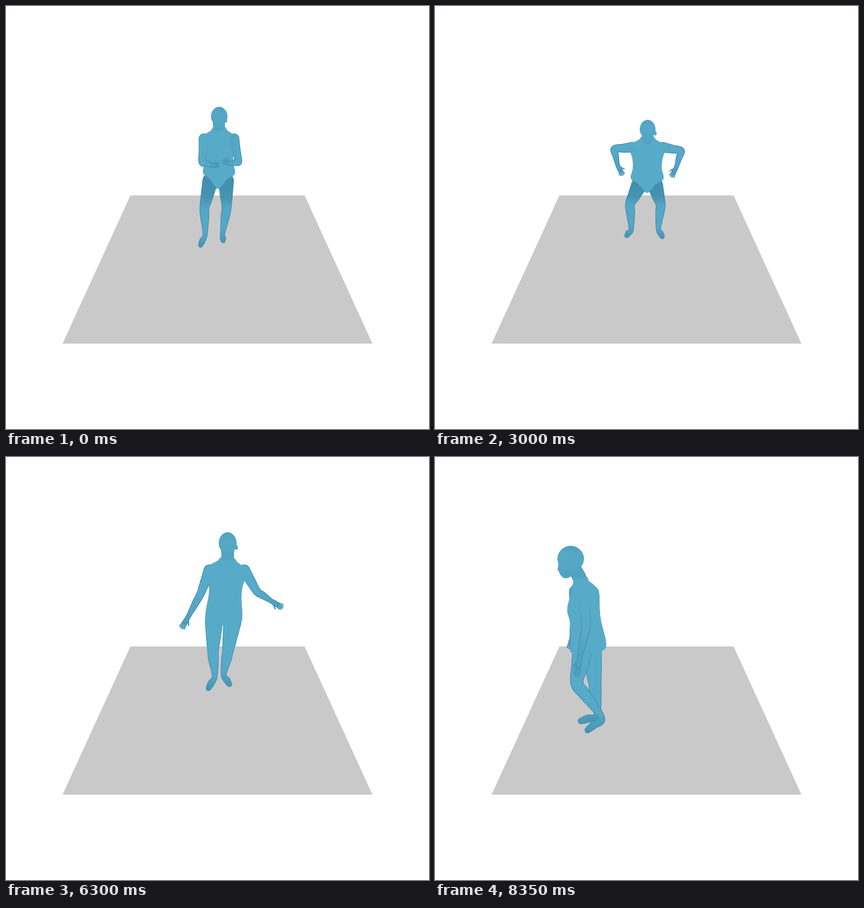
Write an HTML page with a canvas that moves like this. It is 748x748 px and loops after 8.4 s.

```html
<!DOCTYPE html>
<html lang="en">
<head>
<meta charset="utf-8">
<title>Figure on a floor</title>
<style>
html, body { margin: 0; width: 100%; height: 100%; overflow: hidden; background: #fff; }
canvas { display: block; }
</style>
</head>
<body>
<canvas id="stage" width="748" height="748"></canvas>
<script>
const ctx = document.getElementById('stage').getContext('2d');
const LOOP = 8400, STEP = 50, TURNED = 6900;
const BASE = [87, 171, 201], DARK = [66, 140, 171];
const tone = (k, alpha = 1) =>
  `rgba(${BASE.map((v, i) => Math.round(v + (DARK[i] - v) * k))},${alpha})`;
const EDGE = tone(.9);

// look: size, turn to the side, seated. spine: head, neck, crotch.
// Arms: elbow, wrist, fingertip. Legs: knee, ankle, toe.
const rest = {
  look: [.9, .15, 1], spine: [377,195, 377,214, 375,323],
  armL: [347,276, 365,282, 377,281], armR: [411,275, 396,279, 383,273],
  legL: [351,357, 352,404, 344,423], legR: [390,357, 383,403, 384,415]
};
const braced = {
  look: [.9, .05, 1], spine: [380,195, 379,215, 376,323],
  armL: [340,276, 354,288, 367,293], armR: [414,276, 400,288, 386,292],
  legL: [345,357, 344,405, 335,422], legR: [395,358, 385,405, 390,421]
};
const crouch = {
  look: [.9, 0, 1], spine: [376,218, 376,231, 375,330],
  armL: [317,253, 323,281, 332,300], armR: [435,256, 427,284, 418,303],
  legL: [345,350, 347,395, 339,406], legR: [399,351, 395,394, 402,408]
};
const stand = {
  look: [1, .1, 0], spine: [368,142, 369,167, 371,291],
  armL: [330,240, 323,274, 327,306], armR: [412,238, 420,274, 420,305],
  legL: [355,338, 356,383, 350,402], legR: [389,338, 390,381, 395,404]
};
const sway = {
  look: [1.02, 0, 0], spine: [392,152, 392,178, 384,297],
  armL: [344,242, 323,281, 310,304], armR: [444,238, 468,254, 490,267],
  legL: [366,345, 369,388, 358,409], legR: [392,345, 385,385, 395,402]
};
const stride = {
  look: [1.12, .6, 0], spine: [330,177, 345,206, 350,350],
  armL: [319,285, 308,318, 305,347], armR: [382,300, 375,348, 374,383],
  legL: [333,384, 370,402, 373,420], legR: [358,400, 361,458, 336,479]
};
const exit = {
  look: [1.18, 1, 0], spine: [240,180, 255,212, 262,352],
  armL: [248,290, 243,318, 239,340], armR: [267,299, 256,354, 250,388],
  legL: [283,403, 286,457, 258,467], legR: [251,400, 295,462, 270,483]
};

function blend(a, b, k, legs = k) {
  const out = {};
  for (const part in a) {
    const amount = part.startsWith('leg') ? legs : k;
    out[part] = a[part].map((v, i) => v + (b[part][i] - v) * amount);
  }
  return out;
}
const spread = {
  ...blend(stand, sway, .35),
  armL: [317,230, 288,253, 270,262], armR: [448,226, 486,240, 514,249]
};
const keys = [
  [0, rest], [1200, braced],
  [1700, blend(braced, crouch, .3, 0)], [2500, blend(braced, crouch, .78, .2)],
  [3000, crouch], [3400, blend(crouch, stand, .12, .08)],
  [4200, stand], [5100, stand], [5700, spread], [6300, sway],
  [TURNED, blend(sway, stride, .52)], [7500, stride], [8350, exit]
];

// Monotone cubic through all keys.
function valueAt(n, t, part, i) {
  const time = k => keys[k][0], val = k => keys[k][1][part][i];
  const slope = k => (val(k + 1) - val(k)) / (time(k + 1) - time(k));
  const tangent = k => {
    if (k === 0) return slope(0);
    if (k === keys.length - 1) return slope(k - 1);
    const a = slope(k - 1), b = slope(k);
    return a * b > 0 ? 2 * a * b / (a + b) : 0;
  };
  const h = time(n + 1) - time(n), u = (t - time(n)) / h, w = 1 - u;
  return val(n) * (1 + 2 * u) * w * w + tangent(n) * h * u * w * w
    + val(n + 1) * u * u * (3 - 2 * u) - tangent(n + 1) * h * u * u * w;
}
function poseAt(t) {
  let n = 0;
  while (n < keys.length - 2 && keys[n + 1][0] <= t) n++;
  const out = {};
  for (const part in rest) out[part] = rest[part].map((_, i) => valueAt(n, t, part, i));
  return out;
}

// Geometry helpers; a point is [x, y] and a limb point is [x, y, radius].
const pairs = p => [0, 2, 4].map(i => [p[i], p[i + 1]]);
const between = (a, b, k) => [a[0] + (b[0] - a[0]) * k, a[1] + (b[1] - a[1]) * k];
function curve(a, b, c, d, u) {
  return b.map((v, o) => v + .5 * u * (c[o] - a[o] + u * (2 * a[o] - 5 * v + 4 * c[o] - d[o]
    + u * (3 * (v - c[o]) + d[o] - a[o]))));
}
function outline(points) {
  const n = points.length, path = new Path2D(), at = i => points[(i + n) % n];
  for (let i = 0; i < n; i++) for (let u = 0; u < 1; u += .125)
    path.lineTo(...curve(at(i - 1), at(i), at(i + 1), at(i + 2), u));
  path.closePath();
  return path;
}
function limb(points, inset = 0) {
  const path = new Path2D(), last = points.length - 1;
  const at = i => points[Math.max(0, Math.min(last, i))];
  for (let i = 0; i < last; i++) for (let s = 0; s <= 20; s++) {
    const [x, y, r] = curve(at(i - 1), at(i), at(i + 1), at(i + 2), s / 20);
    path.moveTo(x + r - inset, y);
    path.arc(x, y, Math.max(.5, r - inset), 0, Math.PI * 2);
  }
  return path;
}
function fill(path, style) { ctx.fillStyle = style; ctx.fill(path); }
function ramp(a, b, stops) {
  const g = ctx.createLinearGradient(...a, ...b);
  stops.forEach(([at, color]) => g.addColorStop(at, color));
  return g;
}

// Body rows: place along the spine, half width from the front, then front and back in profile.
const ROWS = [
  [0, 10, 8, 10], [.06, 17, 9, 14], [.12, 28, 11, 22], [.2, 35, 13, 28],
  [.4, 29, 20, 28], [.57, 28, 17, 29], [.85, 31.5, 18, 35], [.95, 28, 17, 28]
];
function torsoOf({ look: [size, turn, sit], spine }) {
  const [, neck, crotch] = pairs(spine), left = [], right = [];
  const len = Math.hypot(crotch[0] - neck[0], crotch[1] - neck[1]);
  const nx = (crotch[1] - neck[1]) / len * size, ny = (neck[0] - crotch[0]) / len * size;
  for (const [place, front, fore, back] of ROWS) {
    const low = place > .8 ? sit : 0;
    const [x, y] = between(neck, crotch, place - .1 * low);
    const pinch = place > .9 ? 1 - .4 * low : 1;
    const a = (front + (fore - front) * turn) * pinch, b = (front + (back - front) * turn) * pinch;
    left.push([x - nx * a, y - ny * a]);
    right.unshift([x + nx * b, y + ny * b]);
  }
  return outline([...left, crotch, ...right]);
}
function headOf({ look: [size, turn], spine }) {
  const [[x, y], neck] = pairs(spine), path = new Path2D();
  const oval = (dx, dy, rx, ry) => {
    path.moveTo(x + (dx + rx) * size, y + dy * size);
    path.ellipse(x + dx * size, y + dy * size, rx * size, ry * size, 0, 0, Math.PI * 2);
  };
  oval(0, 0, 15 + 4.5 * turn, 18 + turn);
  oval(-7 * turn, 14, 11, 15);
  oval(15 * (1 - .8 * turn), 8, 2, 4);
  path.moveTo(x - 17 * turn * size, y + 4 * size);
  path.lineTo(x - 10 * turn * size, y + 20 * size);
  path.lineTo(x - 19 * Math.max(0, turn) ** .25 * size, y + 17 * size);
  path.closePath();
  path.addPath(limb([[x + 5 * turn * size, y + 14 * size, 10 * size], [...neck, 10 * size]]));
  return path;
}
function armOf({ look: [size, turn], spine, ['arm' + 'L']: armL, armR }, side) {
  const [, neck, crotch] = pairs(spine), [elbow, wrist, tip] = pairs(side < 0 ? armL : armR);
  const [x, y] = between(neck, crotch, .19);
  const shoulder = [x + side * 30 * size * (1 - .8 * turn * turn), y];
  const points = [
    [...shoulder, 10.5], [...between(shoulder, elbow, .5), 8.6], [...elbow, 7],
    [...between(elbow, wrist, .4), 6.3], [...wrist, 4.2], [...between(wrist, tip, .4), 4.6]
  ].map(([px, py, r]) => [px, py, r * size]);
  return { points, shoulder, elbow, wrist, tip, size, side };
}
function legOf({ look: [size, turn, sit], spine, legL, legR }, side) {
  const [, , crotch] = pairs(spine), [knee, ankle, toe] = pairs(side < 0 ? legL : legR);
  const wide = side * 16 * (1 - 1.4 * turn * turn) + 6 * turn * turn;
  const hip = [crotch[0] + wide * size, crotch[1] - (5 + 9 * sit + 8 * turn) * size];
  const points = [
    [...hip, 15.5], [...between(hip, knee, .5), 12.8], [...knee, 9.7],
    [...between(knee, ankle, .33), 9], [...ankle, 5], [...between(ankle, toe, .6), 6], [...toe, 4.7]
  ].map(([px, py, r]) => [px, py, r * size]);
  return { points, hip, knee, ankle, toe, sit };
}

function paintHand({ wrist, tip, size, side }) {
  const dx = tip[0] - wrist[0], dy = tip[1] - wrist[1], len = Math.hypot(dx, dy);
  const nx = dy / len * size, ny = -dx / len * size;
  const place = (k, off) => [wrist[0] + dx * k + nx * off, wrist[1] + dy * k + ny * off];
  ctx.strokeStyle = tone(.5);
  ctx.lineCap = 'round';
  ctx.lineWidth = 2.5 * size;
  ctx.beginPath();
  for (let j = -1.5; j < 2; j++) {
    ctx.moveTo(...place(.4, j * 2.2));
    ctx.lineTo(...place(.98 - .06 * Math.abs(j), j * 3));
  }
  ctx.moveTo(...place(.2, -side * 2));
  ctx.lineTo(...place(.55, -side * 8));
  ctx.stroke();
}
function paintArm(arm) {
  paintHand(arm);
  fill(limb(arm.points), ramp(arm.shoulder, arm.elbow, [[.2, tone(.9, 0)], [1, EDGE]]));
  fill(limb(arm.points, 1.2), ramp(arm.elbow, arm.tip, [[0, tone(0)], [.8, tone(.35)]]));
}
function paintLeg({ points, hip, knee, ankle, toe, sit }) {
  const top = hip[1], bottom = Math.max(ankle[1], toe[1]);
  const kneeAt = (knee[1] - top) / (bottom - top);
  fill(limb(points), EDGE);
  fill(limb(points, 1.2), ramp([0, top], [0, bottom], [
    [0, tone(.9 * sit)], [kneeAt * .6, tone(.8 * sit)], [kneeAt, tone(.15 * sit)],
    [.8, tone(.1)], [1, tone(.65)]
  ]));
}

function draw(t) {
  const pose = poseAt(t), head = headOf(pose), torso = torsoOf(pose);
  const armL = armOf(pose, -1), armR = armOf(pose, 1);
  ctx.clearRect(0, 0, 748, 748);
  fill(new Path2D('M220 335H528L648 597H100Z'), '#c9c9c9');

  // Dark silhouette first, so that only outer borders keep their line.
  fill(limb(armL.points), EDGE);
  if (t > TURNED) paintArm(armL);
  fill(limb(armR.points), EDGE);
  ctx.strokeStyle = EDGE;
  ctx.lineWidth = 1;
  ctx.stroke(torso);
  ctx.stroke(head);

  paintLeg(legOf(pose, -1));
  paintLeg(legOf(pose, 1));
  fill(torso, tone(0));
  if (t <= TURNED) paintArm(armL);
  paintArm(armR);

  const y = pose.spine[1], size = pose.look[0];
  fill(head, ramp([0, y - 18 * size], [0, y + 34 * size], [
    [0, tone(.35)], [.25, tone(.08)], [.65, tone(.2)], [.85, tone(.3)], [1, tone(0)]
  ]));
}

function tick() {
  draw(Math.floor(performance.now() % LOOP / STEP) * STEP);
  requestAnimationFrame(tick);
}
tick();
</script>
</body>
</html>
```
